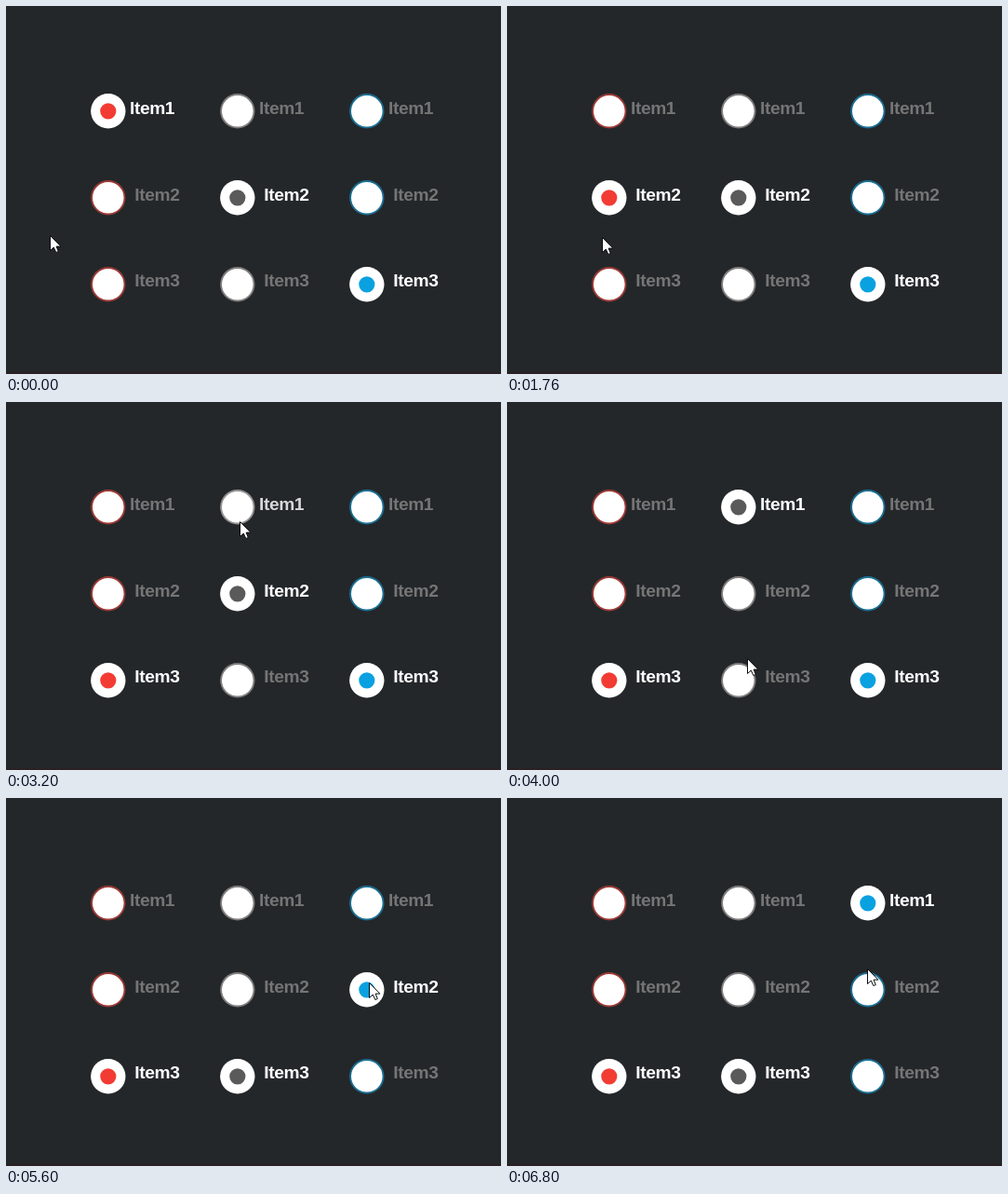
An HTML page with a canvas that plays this animation: 532x395 px, repeating every 7520 ms.

```html
<!DOCTYPE html>
<html lang="en">
<head>
<meta charset="utf-8">
<title>Radio buttons</title>
<style>
  html, body { margin: 0; width: 100%; height: 100%; overflow: hidden; background: #23272a; }
  canvas { display: block; }
</style>
</head>
<body>
<canvas id="stage" width="532" height="395"></canvas>
<script>
const ctx = document.getElementById('stage').getContext('2d');
const LOOP = 7520, STEP = 80;
const centerX = col => 109.8 + col * 139;
const centerY = row => 112.8 + row * 93;

const columns = [
  { dot: '#f23c33', ring: '#9c3a35', hover: '#f0473e' },
  { dot: '#5a5a5a', ring: '#807d7d', hover: '#959292' },
  { dot: '#0aa1e0', ring: '#1b6f92', hover: '#12a0dc' }
];

// Pointer trips: each eases along a curve from the last stop, bent towards "via"
const home = [48, 246];
const trips = [
  { start: 640, end: 1280, via: [75, 227], to: [102, 208] },
  { start: 1520, end: 2000, via: [103, 248], to: [104, 288] },
  { start: 2480, end: 3280, via: [262, 310], to: [252, 117] },
  { start: 3600, end: 4120, via: [272, 215], to: [255, 297] },
  { start: 4480, end: 5120, via: [360, 315], to: [391, 201] },
  { start: 5540, end: 6080, via: [388, 159], to: [385, 117] },
  { start: 6480, end: 6800, via: [386, 150], to: [388, 183] }
];
const clicks = [1280, 2160, 3360, 4320, 5360, 6240];

const arrow = new Path2D('M0 0V16L3.8 12.6 6.3 18 8.8 17 6.6 11.6H11.4Z');

function pointerAt(t) {
  let from = home;
  for (const { start, end, via, to } of trips) {
    if (t < start) break;
    const k = Math.min(1, (t - start) / (end - start));
    const s = k * k * (3 - 2 * k);
    from = from.map((a, i) => a * (1 - s) ** 2 + 2 * s * (1 - s) * via[i] + to[i] * s * s);
  }
  return from;
}

// Selected row of each column once the clicks up to time t have happened
function selectionAt(t) {
  const rows = [0, 1, 2];
  for (const click of clicks.filter(c => c <= t)) {
    const [x, y] = pointerAt(click);
    rows[Math.round((x - centerX(0)) / 139)] = Math.round((y - centerY(0)) / 93);
  }
  return rows;
}

function disc(x, y, r, color) {
  ctx.fillStyle = color;
  ctx.beginPath();
  ctx.arc(x, y, r, 0, Math.PI * 2);
  ctx.fill();
}

function drawItem(col, row, selected, px, py) {
  const { dot, ring, hover } = columns[col];
  const x = centerX(col), y = centerY(row);
  const hovered = Math.hypot(px - x, py - y) < 19;

  disc(x, y, 18.7, selected ? '#fff' : hovered ? hover : ring);
  disc(x, y, 16.8, '#fff');
  if (selected) disc(x, y, 8.6, dot);

  ctx.fillStyle = selected ? '#fff' : hovered ? '#d8d8d8' : '#757575';
  ctx.fillText('Item' + (row + 1), x + (row ? 28.5 : 23.2), 116 + Math.round(row * 92.6));
}

function draw(now) {
  const t = Math.floor(now % LOOP / STEP) * STEP;
  const [px, py] = pointerAt(t);
  const current = selectionAt(t), previous = selectionAt(t - STEP);

  ctx.fillStyle = '#23272a';
  ctx.fillRect(0, 0, 532, 395);
  ctx.fillStyle = '#2a2023';
  ctx.fillRect(0, 393, 532, 2);

  ctx.font = 'bold 19.2px "Liberation Sans", Arial, sans-serif';
  ctx.letterSpacing = '-0.4px';
  for (let col = 0; col < 3; col++)
    for (let row = 0; row < 3; row++)
      drawItem(col, row, row === current[col] || row === previous[col], px, py);

  ctx.save();
  ctx.translate(Math.round(px) - .5, Math.round(py) + .5);
  ctx.fillStyle = '#fff';
  ctx.strokeStyle = '#0c0d0f';
  ctx.fill(arrow);
  ctx.stroke(arrow);
  ctx.restore();
}

const start = performance.now();
function frame() {
  draw(performance.now() - start);
  requestAnimationFrame(frame);
}
frame();
</script>
</body>
</html>
```
